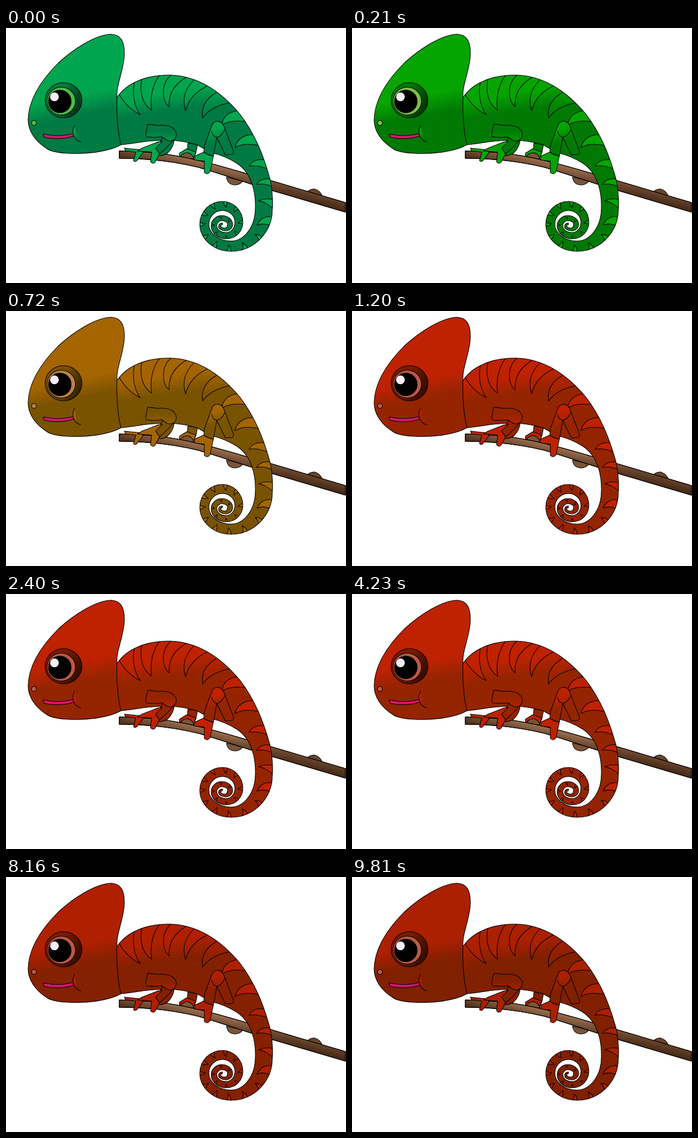
An HTML page without scripts for the animation above (9.84 s loop, 600 by 450 pixels).

```html
<!DOCTYPE html>
<html lang="en">
<head>
<meta charset="utf-8">
<title>Chameleon</title>
<style>
@property --h { syntax: "<number>"; inherits: true; initial-value: 149; }
@property --v { syntax: "<percentage>"; inherits: true; initial-value: 32.3%; }
html, body { margin: 0; width: 100%; height: 100%; overflow: hidden; background: #fff; }
svg {
  display: block; width: 600px; height: 450px;
  --light: hsl(var(--h) 100% var(--v));
  --dark: hsl(calc(var(--h) + 4) 100% calc(var(--v) - 8.4%));
  --ring: hsl(calc(var(--h) * .79) 47% 51%);
  stroke: #000; stroke-width: 1.05; stroke-linejoin: round; stroke-linecap: round;
  animation: camouflage 9.84s linear infinite;
}
path { vector-effect: non-scaling-stroke; }
.l { stop-color: var(--light); }
.d { stop-color: var(--dark); }
.lid { stop-color: hsl(calc(var(--h) + 3) 100% 24%); }
.lid.deep { stop-color: hsl(calc(var(--h) + 3) 100% 11%); }
.light { fill: var(--light); }
.dark { fill: var(--dark); }
.ring { fill: var(--ring); }
.line { fill: none; }
/* green runs through olive and ochre to red, then slowly deepens */
@keyframes camouflage {
  0% { --h: 149; --v: 32.3%; }
  4.27% { --h: 87; --v: 32.2%; }
  7.32% { --h: 37; --v: 32.2%; }
  9.2% { --h: 10.7; --v: 37.5%; }
  43% { --h: 10.7; --v: 37.5%; }
  66.2% { --h: 10.7; --v: 35.3%; }
  99.7%, 100% { --h: 11.2; --v: 33.5%; }
}
</style>
</head>
<body>
<svg viewBox="0 0 600 450">
  <defs>
    <linearGradient id="headFill" gradientUnits="userSpaceOnUse" x1="113" y1="122" x2="120" y2="156">
      <stop class="l"/><stop class="d" offset="1"/>
    </linearGradient>
    <linearGradient id="bodyFill" gradientUnits="userSpaceOnUse" x1="276" y1="115" x2="281" y2="147">
      <stop class="l"/><stop class="d" offset="1"/>
    </linearGradient>
    <linearGradient id="stripeFill" gradientUnits="userSpaceOnUse" x1="276" y1="122" x2="284" y2="166">
      <stop class="l"/><stop class="d" offset="1"/>
    </linearGradient>
    <linearGradient id="armFill" x1="0" y1="0" x2="0" y2="1.3">
      <stop class="d" offset=".3"/><stop class="l" offset="1"/>
    </linearGradient>
    <linearGradient id="legFill" gradientUnits="userSpaceOnUse" x1="370" y1="178" x2="377" y2="197">
      <stop class="l"/><stop class="d" offset="1"/>
    </linearGradient>
    <linearGradient id="cheekFill" x2="1">
      <stop class="l" offset=".2"/><stop class="d" offset="1"/>
    </linearGradient>
    <linearGradient id="lidFill" x1=".2" y1=".2" x2="1" y2=".6">
      <stop class="lid" offset=".3"/><stop class="lid deep" offset=".95"/>
    </linearGradient>
    <linearGradient id="bark" gradientUnits="userSpaceOnUse" x1="470" y1="268" x2="465" y2="289">
      <stop stop-color="#95694a"/><stop stop-color="#55351f" offset="1"/>
    </linearGradient>
    <linearGradient id="shade" gradientUnits="userSpaceOnUse" x1="200" x2="599" y1="0" y2="0">
      <stop stop-color="#2a1508" stop-opacity=".1"/><stop stop-color="#2a1508" stop-opacity="0" offset=".3"/>
      <stop stop-color="#2a1508" stop-opacity="0" offset=".5"/><stop stop-color="#2a1508" stop-opacity=".3" offset=".75"/>
    </linearGradient>
    <path id="twig" d="M200 217C238 217 290 221 345 235C390 246 430 259 470 270L599 308V325L470 287C425 274 385 259 340 246C295 235 245 230 200 230Z"/>
    <path id="fang" class="light" d="M-4.500 0Q-4 7 2 12Q1 6 4.500 0"/>
    <path id="trunk" d="M190 132C200 114 212 103 227 96C245 87 265 83 288 83C340 84 380 113 412 151
      C440 187 455 227 466 267C470 285 471 303 470 320
      A73 74 0 0 1 397 394A55 48 0 0 1 342 346A40 40 0 0 1 382 306A36 37 0 0 1 418 343
      A29 29 0 0 1 389 372A27 23 0 0 1 362 349A19 18 0 0 1 381 331A19 16 0 0 1 400 347
      A13 11 0 0 1 387 358A12 8 0 0 1 375 350A7 6 0 0 1 382 344L382 347
      A3 3 0 0 0 379 350A8 3 0 0 0 387 353A4 7 0 0 0 391 346A10 6 0 0 0 381 340
      A9 9 0 0 0 372 349A16 12 0 0 0 388 361A16 18 0 0 0 404 343A22 21 0 0 0 382 322
      A24 24 0 0 0 358 346A39 30 0 0 0 397 376A43 58 0 0 0 440 318
      C441 290 434 257 408 239C392 229 376 223 362 220L337 206C320 201 300 198 285 198C255 197 228 204 203 206L190 200Z"/>
    <clipPath id="skin"><use href="#trunk"/></clipPath>
  </defs>

  <g id="farHindLeg">
    <path class="dark" d="M321 203L338 206L335 221L330 229L320 215Z"/>
    <path class="light" d="M319 213L335 219L331 230L306 226V221Z"/>
  </g>

  <g id="branch">
    <g fill="#7b5438">
      <path d="M306 230Q311 220 320 220Q328 221 332 231Z"/>
      <path d="M389 263Q391 277 405 277Q414 276 418 270Z"/>
      <path d="M530 291Q536 284 544 284Q554 286 559 298Z" fill="#6b452b"/>
    </g>
    <use href="#twig" fill="url(#bark)"/>
    <use href="#twig" fill="url(#shade)"/>
  </g>

  <g id="farFrontLeg">
    <path class="dark" d="M278 196H297Q296 210 286 220Q278 226 270 225L264 212Z"/>
    <path class="light" d="M209 212L238 215L242 220L231 234Q227 237 225 234L229 219L211 217Z"/>
  </g>

  <g id="body">
    <use href="#trunk" fill="url(#bodyFill)" stroke="none"/>
    <g clip-path="url(#skin)">
      <g fill="url(#stripeFill)">
        <path d="M199 116C208 133 224 147 237 153C226 139 222 114 227 94"/>
        <path d="M240 89C234 116 243 136 257 145C253 120 260 97 272 82"/>
        <path d="M293 82C273 96 274 129 288 139C286 114 300 97 320 86"/>
        <path d="M332 91C314 109 311 128 317 146C322 126 334 112 356 102"/>
        <path d="M371 114C351 126 344 141 347 159C355 147 371 137 394 132"/>
      </g>
      <g class="light">
        <path d="M407 146C391 149 382 158 381 172C390 164 404 163 422 165"/>
        <path d="M436 188C419 188 407 197 404 211C415 204 429 204 445 207"/>
        <path d="M458 233C443 230 433 236 429 244C440 242 450 244 463 249"/>
        <path d="M468 267C455 264 446 269 442 276C451 274 459 275 470 280"/>
        <path d="M472 303C461 300 452 302 446 305C454 306 462 310 472 319"/>
        <path d="M470 333C456 331 447 338 443 348C450 345 456 345 467 349"/>
        <use href="#fang" transform="translate(449 372) rotate(139)"/>
        <use href="#fang" transform="translate(422 390) rotate(164)"/>
        <use href="#fang" transform="translate(393 395) rotate(187)"/>
        <use href="#fang" transform="translate(366 387) rotate(220)"/>
        <use href="#fang" transform="translate(348 370) rotate(245) scale(.9)"/>
        <use href="#fang" transform="translate(341 346) rotate(275) scale(.9)"/>
        <use href="#fang" transform="translate(347 326) rotate(302) scale(.9)"/>
        <use href="#fang" transform="translate(364 310) rotate(338) scale(.9)"/>
        <use href="#fang" transform="translate(388 306) rotate(8) scale(.9)"/>
        <use href="#fang" transform="translate(408 317) rotate(45) scale(.8)"/>
        <use href="#fang" transform="translate(418 343) rotate(88) scale(.7)"/>
        <use href="#fang" transform="translate(409 364) rotate(137) scale(.6)"/>
        <use href="#fang" transform="translate(389 372) rotate(180) scale(.5)"/>
        <use href="#fang" transform="translate(369 364) rotate(230) scale(.5)"/>
        <use href="#fang" transform="translate(362 348) rotate(275) scale(.5)"/>
        <use href="#fang" transform="translate(379 331) rotate(355) scale(.5)"/>
        <use href="#fang" transform="translate(396 338) rotate(45) scale(.45)"/>
      </g>
    </g>
    <use href="#trunk" fill="none"/>
  </g>

  <g id="nearLegs">
    <path class="dark" d="M277 193L264 212L271 222Q286 210 297 195Z"/>
    <path class="light" d="M268 201L240 212L232 217L257 219L255 236Q259 241 263 237L271 222L264 212L276 200Z"/>
    <path fill="url(#armFill)" d="M250 170Q258 170 268 172Q287 170 296 178Q303 185 299 194Q293 202 284 198L275 192Q261 194 249 192Q246 191 247 184Z"/>
    <path fill="url(#legFill)" d="M364 170L350 208L349 219Q357 225 366 226L372 193L387 224L399 223Q403 221 401 216L384 172C380 163 369 162 364 170Z"/>
    <path class="line" d="M363 182Q364 191 372 193Q380 192 386 180"/>
    <path class="light" d="M349 219Q357 225 366 226L360 254Q355 260 350 255L350 235L333 233V226Z"/>
  </g>

  <g id="head">
    <path fill="url(#headFill)" d="M203 206C180 219 140 223 108 221C90 220 78 218 71 212C52 200 39 182 39 162
      C40 125 62 92 92 62C120 36 160 11 186 11C203 12 209 24 209 46C208 72 198 92 196 112C195 140 196 180 203 206Z"/>
    <ellipse cx="101.5" cy="127.5" rx="32.5" ry="31" fill="url(#lidFill)"/>
    <ellipse class="ring" cx="97.5" cy="129" rx="25" ry="24.5"/>
    <circle cx="95" cy="129.500" r="20"/>
    <circle cx="85.500" cy="121.500" r="7.700" fill="#f4edf7" stroke="none"/>
    <circle class="ring" cx="49.300" cy="167.500" r="4.300"/>
    <path d="M66 187C85 191 105 190 119 186V191C101 197 80 196 68 193Q65 190 66 187Z" fill="#d3176a"/>
    <path fill="url(#cheekFill)" stroke="none" d="M121 172C116 180 117 189 121 192L127 192Q122 184 121 172Z"/>
    <path class="line" d="M121 172C115 182 118 197 132 201"/>
  </g>
</svg>
</body>
</html>
```
